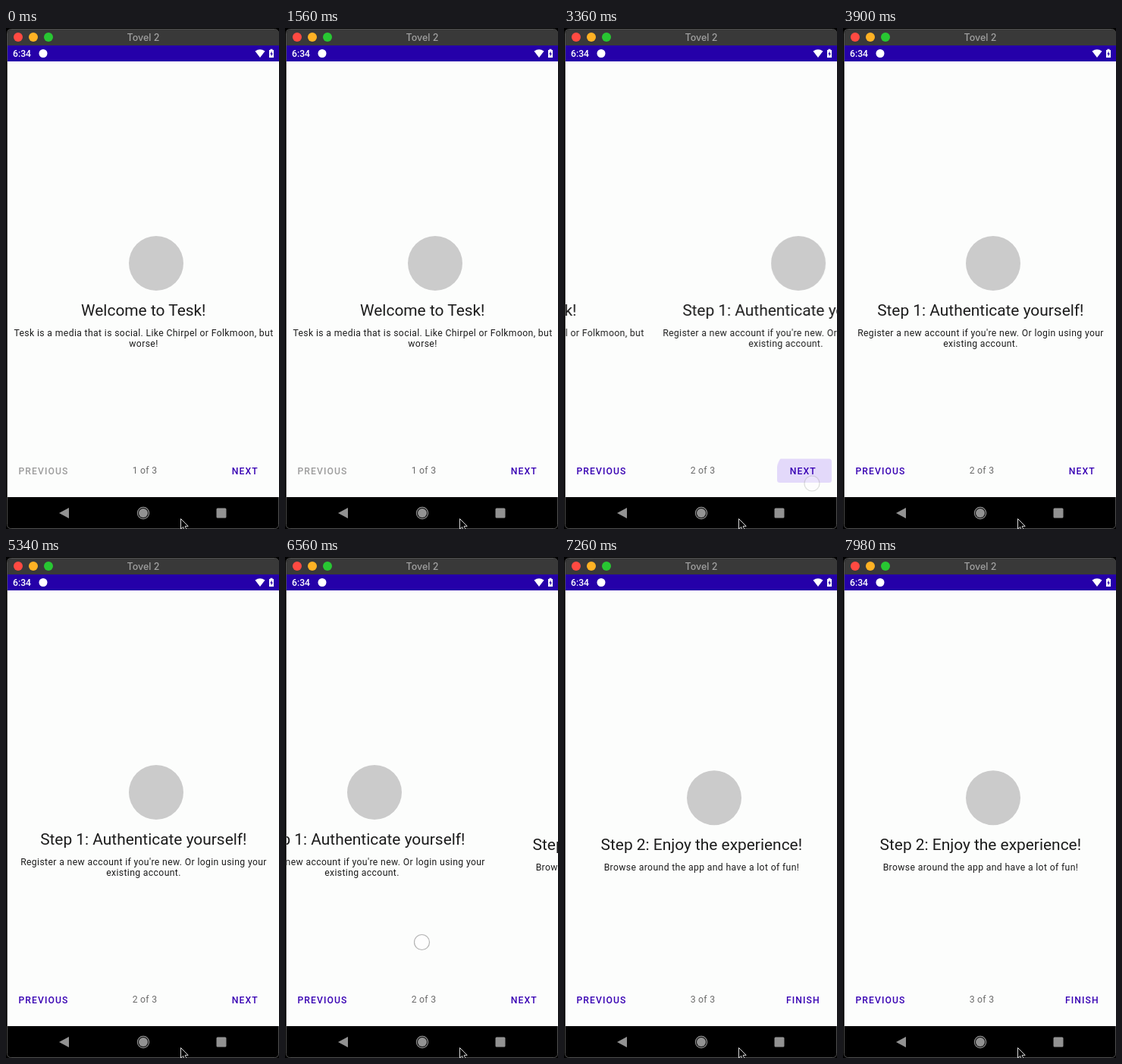
An HTML page that plays this animation: 360 px wide and 660 px high, repeating every 8000 ms.

```html
<!DOCTYPE html>
<html lang="en">
<head>
<meta charset="utf-8">
<title>Onboarding pager</title>
<style>
html, body { margin: 0; width: 100%; height: 100%; overflow: hidden; background: #000; }
svg { display: block; width: 360px; height: 660px; font-family: Roboto, sans-serif; }
text { text-anchor: middle; }

.window-title { font: 500 12.5px Inter, sans-serif; fill: #a0a0a0; }
.clock { font-size: 12.2px; font-weight: 500; fill: #fff; text-anchor: start; }
.title { font-size: 20.9px; fill: #1c1c1c; }
.body { font-size: 12.2px; letter-spacing: .37px; fill: #1c1c1c; }
.count { font-size: 12.2px; letter-spacing: .3px; fill: #6a6a6a; }
.button { font-size: 12.2px; font-weight: 500; letter-spacing: .0893em; fill: #3700b3; }
.nav { fill: #929292; }
.badge { fill: #cbcbcb; }

/* Every animation shares one 8 s clock. */
.pager, .first, .second, .third, .not-last, .previous, .touch, .ripple {
  animation: 8s linear infinite;
}
.pager { animation-name: pager; }
.first, .second, .third, .not-last, .previous { animation-timing-function: step-end; }
.first { animation-name: first; }
.second { animation-name: second; }
.third { animation-name: third; }
.not-last { animation-name: not-last; }
.previous { animation-name: enable; }
.touch { fill: #fff; fill-opacity: .6; stroke: #b4b4b4; stroke-width: 1.2; opacity: 0; }
.tap { animation-name: tap; }
.swipe { animation-name: swipe; }
.ripple { fill: #5a10f0; opacity: 0; transform-origin: 319px 588px; animation-name: ripple; }

@keyframes pager {
  0% { transform: translateX(0); }
  40.95% { transform: translateX(0); animation-timing-function: cubic-bezier(.333, .667, .667, 1); }
  43.35%, 79.75% { transform: translateX(-358px); }
  82% { transform: translateX(-438px); }
  84.475% { transform: translateX(-438px); animation-timing-function: cubic-bezier(.333, .667, .667, 1); }
  88.2%, 100% { transform: translateX(-716px); }
}
@keyframes first { 0% { opacity: 1; } 40.95%, 100% { opacity: 0; } }
@keyframes second { 0% { opacity: 0; } 40.95% { opacity: 1; } 84.475%, 100% { opacity: 0; } }
@keyframes third { 0% { opacity: 0; } 84.475%, 100% { opacity: 1; } }
@keyframes not-last { 0% { opacity: 1; } 84.475%, 100% { opacity: 0; } }
@keyframes enable { 0% { fill: #9c9c9c; } 40.95%, 100% { fill: #3700b3; } }
@keyframes tap {
  0%, 39.74% { opacity: 0; }
  39.75%, 40.95% { opacity: 1; }
  42.9%, 100% { opacity: 0; }
}
@keyframes swipe {
  0%, 79.49% { opacity: 0; transform: translateX(87px); }
  79.5%, 79.75% { opacity: 1; transform: translateX(87px); }
  82%, 84.475% { opacity: 1; transform: none; }
  86.75%, 100% { opacity: 0; transform: none; }
}
@keyframes ripple {
  0%, 39.75% { opacity: 0; transform: scale(.25); }
  40.25% { opacity: .15; }
  42% { opacity: .15; transform: scale(1); }
  44.5%, 100% { opacity: 0; transform: scale(1.2); }
}
</style>
</head>
<body>
<svg viewBox="0 0 360 660">
  <defs>
    <clipPath id="screen"><rect x="2" y="44" width="358" height="574"/></clipPath>
    <clipPath id="button"><rect x="281" y="567.5" width="72" height="31.5" rx="3.5"/></clipPath>
  </defs>
  <rect width="360" height="660"/>

  <!-- Window and status bar -->
  <rect x="1.5" y="1.5" width="358" height="658" rx="5" stroke="#505050"/>
  <path d="M2 23V7Q2 2 7 2H355Q360 2 360 7V23Z" fill="#393939"/>
  <circle cx="16" cy="12" r="6" fill="#ff4a42"/>
  <circle cx="36" cy="12" r="6" fill="#ffb224"/>
  <circle cx="56" cy="12" r="6" fill="#28c732"/>
  <text class="window-title" x="181" y="17">Tovel 2</text>
  <rect x="2" y="23" width="358" height="21" fill="#2500a9"/>
  <text class="clock" x="9" y="38">6:34</text>
  <circle cx="49" cy="33.5" r="5.5" fill="#fff"/>
  <path d="M328.5 30.5Q335 26 341.5 30.5L335 39Z" fill="#fff"/>
  <path d="M347 29h1.5v-1.3h3V29h1.5v10h-6Z" fill="#fff"/>
  <path d="M350.6 30.5l-2.3 4h1.4v3l2.3-4h-1.4Z" fill="#2500a9"/>

  <!-- Pages -->
  <rect x="2" y="44" width="358" height="574" fill="#fcfdfc"/>
  <g clip-path="url(#screen)">
    <g class="pager">
      <g>
        <circle class="badge" cx="198" cy="310" r="36"/>
        <text class="title" x="181.3" y="379">Welcome to Tesk!</text>
        <text class="body" x="181.5" y="405.5">Tesk is a media that is social. Like Chirpel or Folkmoon, but</text>
        <text class="body" x="181.5" y="419.8">worse!</text>
      </g>
      <g transform="translate(358)">
        <circle class="badge" cx="198" cy="310" r="36"/>
        <text class="title" x="181.3" y="379">Step 1: Authenticate yourself!</text>
        <text class="body" x="181.5" y="405.5">Register a new account if you're new. Or login using your</text>
        <text class="body" x="181.5" y="419.8">existing account.</text>
      </g>
      <g transform="translate(716 7.3)">
        <circle class="badge" cx="198" cy="310" r="36"/>
        <text class="title" x="181.3" y="379">Step 2: Enjoy the experience!</text>
        <text class="body" x="181.5" y="405.5">Browse around the app and have a lot of fun!</text>
      </g>
    </g>
  </g>

  <!-- Footer -->
  <g clip-path="url(#button)"><circle class="ripple" cx="319" cy="588" r="39.5"/></g>
  <text class="button previous" x="49.5" y="588">PREVIOUS</text>
  <text class="count first" x="183" y="586.5">1 of 3</text>
  <text class="count second" x="183" y="586.5">2 of 3</text>
  <text class="count third" x="183" y="586.5">3 of 3</text>
  <text class="button not-last" x="315.3" y="588">NEXT</text>
  <text class="button third" x="315.3" y="588">FINISH</text>
  <circle class="touch tap" cx="327" cy="600" r="10"/>
  <circle class="touch swipe" cx="180.5" cy="507.5" r="10"/>

  <!-- Navigation bar and pointer -->
  <path class="nav" d="M70 639L83 632V646Z"/>
  <circle class="nav" cx="181" cy="639" r="6"/>
  <circle cx="181" cy="639" r="7.6" fill="none" stroke="#929292" stroke-width="1.2"/>
  <rect class="nav" x="277.5" y="632.5" width="13" height="13" rx="1.5"/>
  <path d="M230.5 646.5V660L233.6 657.2L236 662.5L238.4 661.4L236.1 656.3H240.2Z" stroke="#dcdcdc"/>
</svg>
</body>
</html>
```
